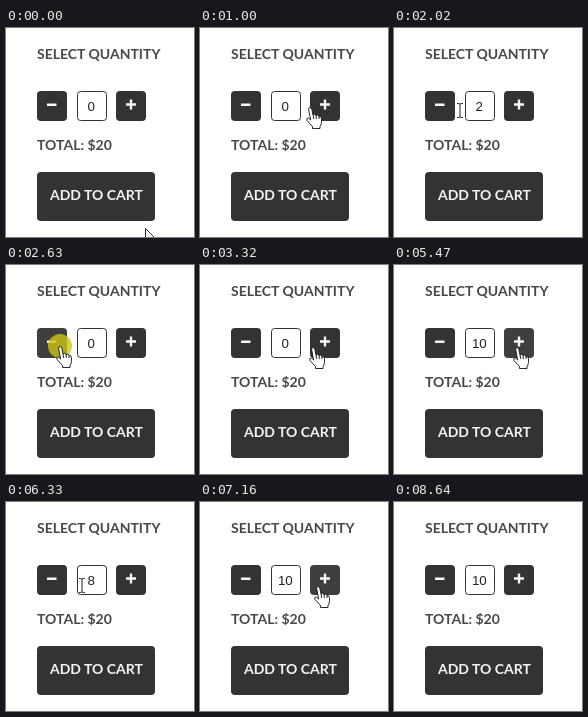
Recreate the animation shown at these times as an HTML page. Size 188x209 px, loop 8.87 s.

```html
<!DOCTYPE html>
<html lang="en">
<head>
<meta charset="utf-8">
<title>Select quantity</title>
<style>
  html, body { margin: 0; width: 100%; height: 100%; overflow: hidden; background: #fff; }
  svg { display: block; }
  text { font: 700 14px Lato, sans-serif; fill: #484848; }
  .light { fill: #f4f4f4; }
  #count { font: 13.33px "Liberation Sans", Arial, sans-serif; fill: #222; text-anchor: middle; }
  .button { fill: #333; }
  .hover { fill: #3f3f3f; }
  .sign { stroke: #f8f8f8; stroke-width: 2.4; }
  .pointer { fill: #fff; stroke: #111; stroke-width: .9; stroke-linejoin: round; }
</style>
</head>
<body>
<svg width="188" height="209" viewBox="0 0 188 209">
  <text x="31" y="31">SELECT QUANTITY</text>
  <rect id="minus" class="button" x="31" y="63" width="30" height="30" rx="4"/>
  <rect id="plus" class="button" x="110" y="63" width="30" height="30" rx="4"/>
  <path class="sign" d="M41 76.7h9.5M120 76.5h10M125 71.5v10"/>
  <rect x="71.5" y="63.5" width="29" height="29" rx="3" fill="#fff" stroke="#333"/>
  <text id="count" x="85.3" y="83">0</text>
  <text x="31" y="122">TOTAL: $20</text>
  <rect class="button" x="31" y="144" width="118" height="49" rx="4"/>
  <text class="light" x="44" y="172">ADD TO CART</text>
  <g id="cursor">
    <circle id="glow" r="12" fill="#cdc414" fill-opacity=".8"/>
    <path id="arrow" class="pointer" d="M.5.5V13.5L3.5 10.7 5.8 16 8 15 5.7 9.9H9.8Z"/>
    <path id="beam" fill="none" stroke="#222" d="M-3-6.5H-1.5L0-6 1.5-6.5H3M0-6V7M-3 7.5H-1.5L0 7 1.5 7.5H3"/>
    <path id="hand" class="pointer" transform="translate(-4)" d="M4.6 13L2.6 2.2Q2.6.6 4 .6T5.8 2L7 8Q8.5 6.6 10 7.8V8.8Q11.5 7.4 13 8.8V9.8Q15.4 9 15.5 11.5V15.5Q15.2 18 14 19.5V21.5H6.5V19.5L1 13.5Q0 11 2.4 11ZM7 8L7.7 12M10 8.5L10.4 12M13 9.5V12"/>
  </g>
</svg>
<script>
const LOOP = 8870, EXIT = 8640, STEP = 77.5;
const $ = id => document.getElementById(id);

// start time, steps, destination x, y
const moves = [
  [70, 6, 42, 92],
  [630, 2, 94, 82],
  [850, 4, 123, 76],
  [1630, 6, 65.5, 82],
  [2100, 2, 54, 81],
  [3085, 5, 123, 82],
  [5780, 3, 50, 83],
  [6330, 3, 118, 84],
  [7470, 6, 113, 161],
  [8310, 4, 155, 198]
];

// first press, number of clicks, change per click
const bursts = [
  [1170, 1, 1], [1480, 1, 1], [2250, 5, -1],
  [3400, 2, 1], [3790, 2, 1], [4235, 6, 1], [5235, 3, 1],
  [5935, 2, -1], [6615, 5, 1]
];

function cursorAt(t) {
  let x = 139, y = 200, settled = true;
  for (const [start, steps, toX, toY] of moves) {
    if (t < start) break;
    const u = Math.min(1, (Math.floor((t - start) / STEP) + 1) / steps);
    const eased = 1 - (1 - u) ** 1.2;
    x += (toX - x) * eased;
    y += (toY - y) * eased;
    settled = u === 1;
  }
  return { x: Math.round(x), y: Math.round(y), settled };
}

// Each click holds for one step and rests for one step.
function clicksAt(t) {
  let count = 0, pressed = false;
  for (const [start, n, change] of bursts) {
    for (let i = 0; i < n; i++) {
      const age = t - start - 2 * i * STEP;
      if (age >= STEP) count = Math.max(0, Math.min(10, count + change));
      else if (age >= 0) pressed = true;
    }
  }
  return { count, pressed };
}

const show = (id, on) => $(id).style.display = on ? "" : "none";

function draw(now) {
  const t = now % LOOP;
  const { x, y, settled } = cursorAt(t);
  const { count, pressed } = clicksAt(t);
  const inside = (l, top, r, b) => x >= l && x <= r && y >= top && y <= b;
  const onMinus = inside(31, 63, 61, 93), onPlus = inside(110, 63, 140, 93);
  const onCart = inside(31, 144, 149, 193);
  const kind = onMinus || onPlus || onCart ? "hand" : inside(61, 63, 110, 93) ? "beam" : "arrow";

  $("count").textContent = count;
  $("cursor").setAttribute("transform", `translate(${x} ${y})`);
  $("minus").classList.toggle("hover", onMinus && settled);
  $("plus").classList.toggle("hover", onPlus && settled);
  show("cursor", t < EXIT);
  show("glow", pressed);
  for (const id of ["arrow", "beam", "hand"]) show(id, id === kind);
}

const begin = performance.now();
function tick() {
  draw(performance.now() - begin);
  requestAnimationFrame(tick);
}
tick();
</script>
</body>
</html>
```
